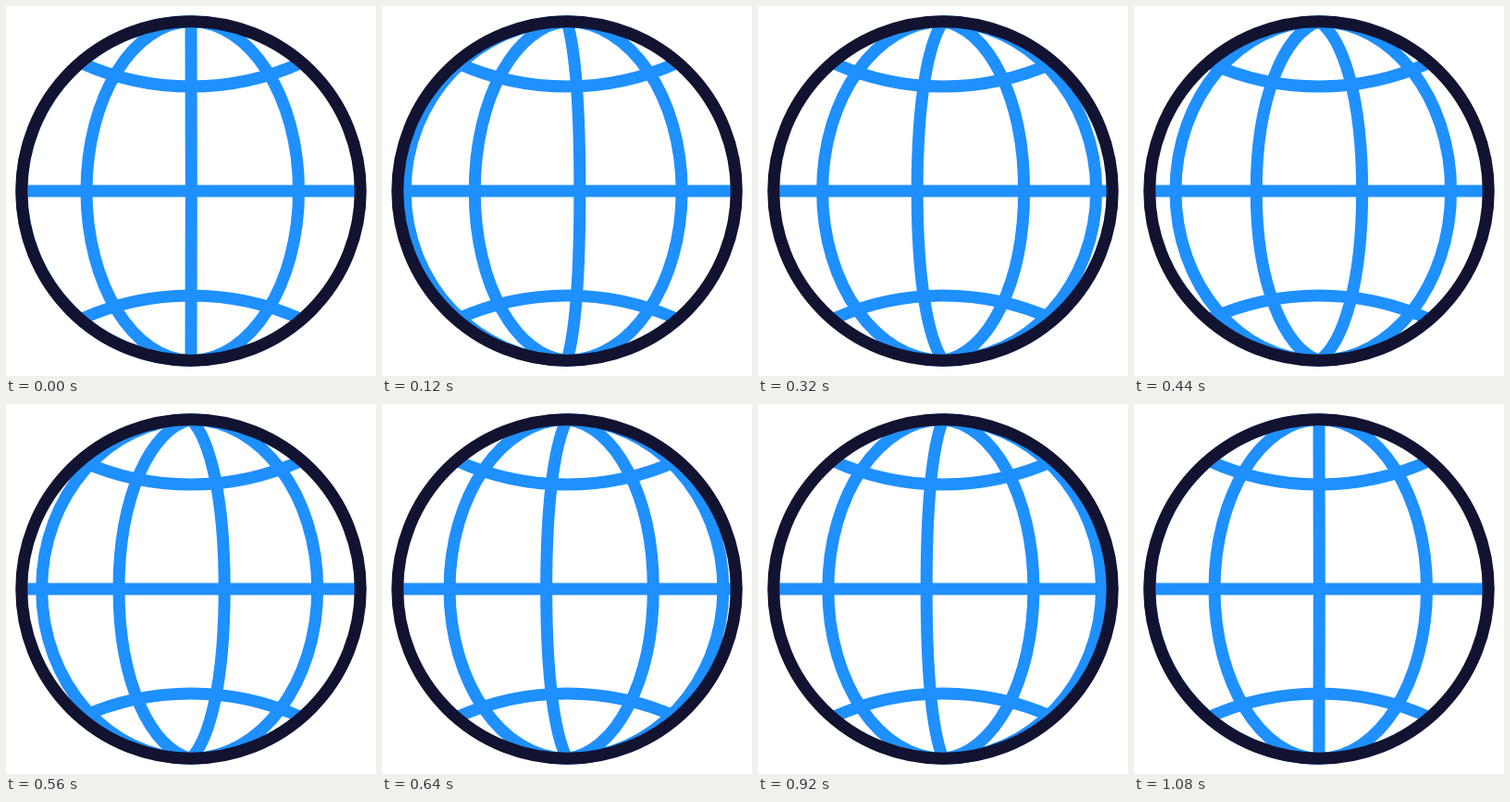
An HTML page with a canvas that plays this animation: 400 px wide and 400 px high, repeating every 1.2 s.

```html
<!DOCTYPE html>
<html lang="en">
<head>
<meta charset="utf-8">
<title>Spinning globe</title>
<style>
  html, body { margin: 0; width: 100%; height: 100%; overflow: hidden; background: #fff; }
  canvas { display: block; width: 400px; height: 400px; }
</style>
</head>
<body>
<canvas id="stage"></canvas>
<script>
const SIZE = 400, LOOP = 1200, STEP = 40;
const R = 183.25, LINE = 13, KAPPA = 0.5523;
const BLUE = '#1e90ff', NAVY = '#121331';

// Equator offsets between which each meridian travels during one turn
const STOPS = [-183, -113, 0.3, 116.5, 182];
// Eased spin: [time in steps, turns, speed in turns per step]
const SPIN = [
  [0, 0, 0], [6, 0.44, 0.138], [11, 1.399, 0.261], [14, 2.309, 0.269],
  [19, 3.371, 0.159], [23, 3.84, 0.079], [27, 4, 0]
];

const canvas = document.getElementById('stage');
const ctx = canvas.getContext('2d');
const dpr = window.devicePixelRatio || 1;
canvas.width = canvas.height = SIZE * dpr;

// Cubic Hermite interpolation through the spin keys
function turnsAt(n) {
  const last = SPIN[SPIN.length - 1];
  if (n >= last[0]) return last[1];
  const i = SPIN.findIndex(key => key[0] > n);
  const [t0, a, va] = SPIN[i - 1], [t1, b, vb] = SPIN[i];
  const h = t1 - t0, s = (n - t0) / h, r = 1 - s;
  return a * (1 + 2 * s) * r * r + va * h * s * r * r
       + b * s * s * (3 - 2 * s) - vb * h * s * s * r;
}

function stroke(color, trace) {
  ctx.strokeStyle = color;
  ctx.lineWidth = LINE;
  ctx.beginPath();
  trace();
  ctx.stroke();
}

// Half ellipse whose poles grow pointed as it nears the centre
function meridian(x) {
  const tip = 30 * Math.max(0, 1 - Math.abs(x) / 115);
  const k = KAPPA * x, m = KAPPA * R;
  stroke(BLUE, () => {
    ctx.moveTo(0, -R);
    ctx.bezierCurveTo(k, -R + tip, x, -m, x, 0);
    ctx.bezierCurveTo(x, m, k, R - tip, 0, R);
  });
}

function parallel(side) {
  const r = 290, half = Math.asin(119 / r), mid = -side * Math.PI / 2;
  stroke(BLUE, () => ctx.arc(0, side * (113 + r), r, mid - half, mid + half));
}

function draw(time) {
  const turn = turnsAt(Math.floor((time % LOOP) / STEP)) % 1;
  ctx.setTransform(dpr, 0, 0, dpr, 0, 0);
  ctx.fillStyle = '#fff';
  ctx.fillRect(0, 0, SIZE, SIZE);
  ctx.translate(SIZE / 2, SIZE / 2);

  for (let i = 0; i < STOPS.length - 1; i++) {
    meridian(STOPS[i] + (STOPS[i + 1] - STOPS[i]) * turn);
  }
  parallel(1);
  parallel(-1);
  stroke(BLUE, () => {
    ctx.moveTo(-R, 0);
    ctx.lineTo(R, 0);
  });
  stroke(NAVY, () => ctx.arc(0, 0, R, 0, Math.PI * 2));
}

const start = performance.now();
function tick() {
  draw(performance.now() - start);
  requestAnimationFrame(tick);
}
tick();
</script>
</body>
</html>
```
